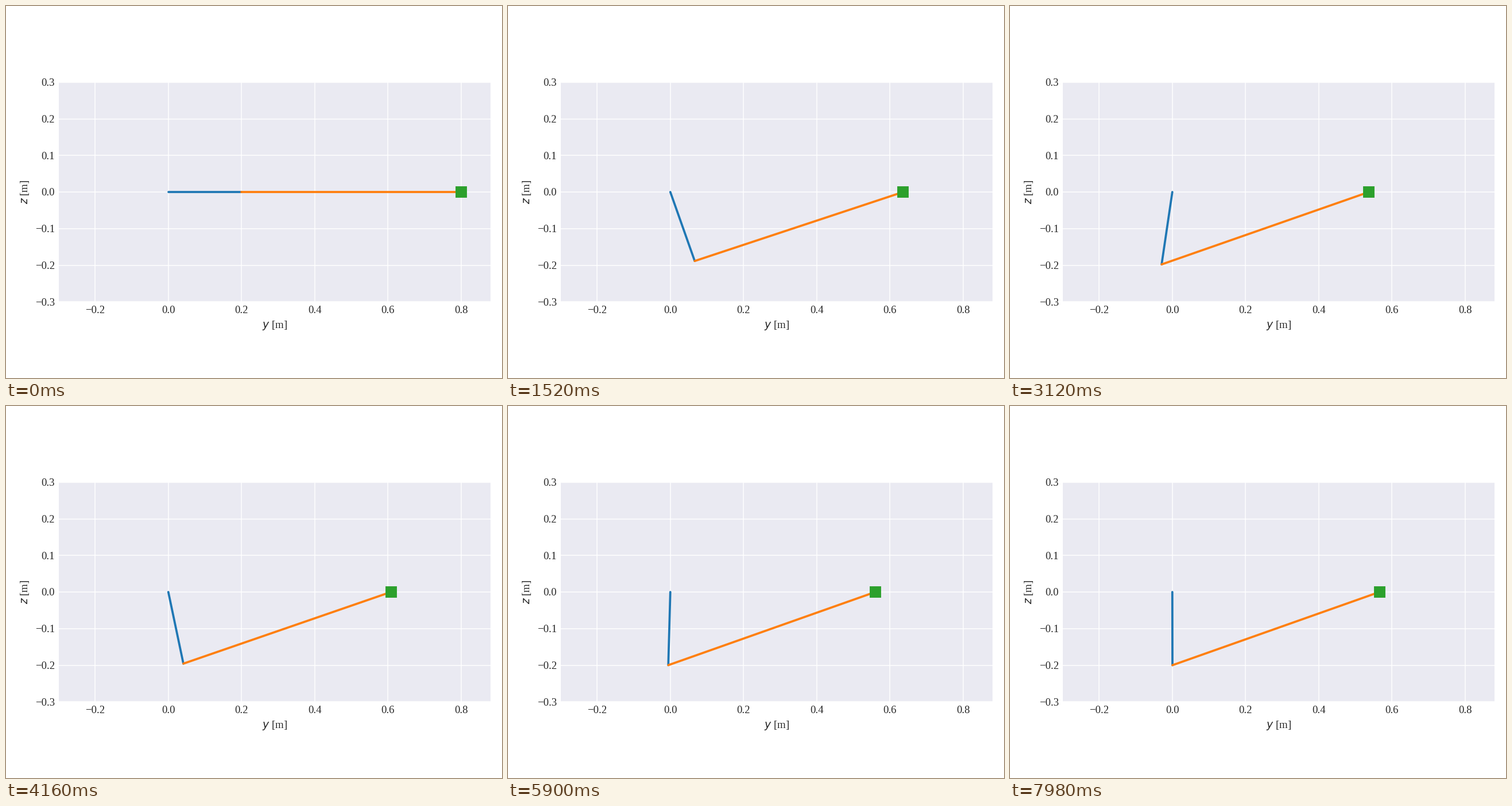
Recreate the animation shown at these times as a matplotlib script. Size 864 by 648 pixels, loop 8000 ms.

```python
import math

import matplotlib.pyplot as plt
from matplotlib.animation import FuncAnimation

# Slider-crank mechanism swinging down under gravity with a damped crank.
CRANK, ROD = 0.2, 0.6
M_CRANK, M_ROD, M_SLIDER = 1.0, 3.0, 1.675
GRAVITY, DAMPING = 9.81, 0.155
FRAMES, INTERVAL, SUBSTEPS = 400, 20, 10

WIDTH, HEIGHT, DPI = 864, 648, 135
INK = "0.15"

plt.rcParams.update({
    "font.family": "Liberation Serif",
    "font.size": 10,
    "mathtext.fontset": "dejavusans",
    "text.color": INK,
    "axes.labelcolor": INK,
    "axes.facecolor": "#EAEAF2",
    "axes.edgecolor": "white",
    "axes.linewidth": 0,
    "axes.grid": True,
    "axes.axisbelow": True,
    "grid.color": "white",
    "grid.linestyle": "-",
    "grid.linewidth": 0.8,
    "lines.solid_capstyle": "round",
    "xtick.color": INK,
    "ytick.color": INK,
    "xtick.major.size": 0,
    "ytick.major.size": 0,
})


def inertia(phi):
    """Effective inertia about the crank angle, measured from straight down."""
    s, c = math.sin(phi), math.cos(phi)
    sin_b = CRANK / ROD * c
    cos_b = math.sqrt(1 - sin_b**2)
    tan_b = sin_b / cos_b
    rod = (c + tan_b * s / 2)**2 + s**2 / 4 + (s / cos_b)**2 / 12
    slider = (c + tan_b * s)**2
    return CRANK**2 * (M_CRANK / 3 + M_ROD * rod + M_SLIDER * slider)


def rates(phi, w):
    h = 1e-4
    slope = (inertia(phi + h) - inertia(phi - h)) / (2 * h)
    weight = (M_CRANK + M_ROD) / 2 * GRAVITY * CRANK * math.sin(phi)
    return w, (-weight - DAMPING * w - slope * w * w / 2) / inertia(phi)


def rk4(phi, w, dt):
    a1, b1 = rates(phi, w)
    a2, b2 = rates(phi + a1 * dt / 2, w + b1 * dt / 2)
    a3, b3 = rates(phi + a2 * dt / 2, w + b2 * dt / 2)
    a4, b4 = rates(phi + a3 * dt, w + b3 * dt)
    return (phi + dt * (a1 + 2 * a2 + 2 * a3 + a4) / 6,
            w + dt * (b1 + 2 * b2 + 2 * b3 + b4) / 6)


def simulate():
    phi, w = math.pi / 2, 0.0
    angles = []
    for _ in range(FRAMES):
        angles.append(phi)
        for _ in range(SUBSTEPS):
            phi, w = rk4(phi, w, INTERVAL / 1000 / SUBSTEPS)
    return angles


angles = simulate()

fig = plt.figure(figsize=(WIDTH / DPI, HEIGHT / DPI), dpi=DPI, facecolor="white")
ax = fig.add_axes([91.5 / WIDTH, 132.75 / HEIGHT, 752.25 / WIDTH, 382.5 / HEIGHT])
ax.set_xlim(-0.3, 0.88)
ax.set_ylim(-0.3, 0.3)
ax.set_xticks([-0.2, 0, 0.2, 0.4, 0.6, 0.8])
ax.set_yticks([-0.3, -0.2, -0.1, 0, 0.1, 0.2, 0.3])
ax.set_xlabel("$y$ [m]")
ax.set_ylabel("$z$ [m]")

crank, = ax.plot([], [], color="#1f77b4", lw=2)
rod, = ax.plot([], [], color="#ff7f0e", lw=2)
slider, = ax.plot([], [], "s", color="#2ca02c", ms=10)


def update(i):
    y = CRANK * math.sin(angles[i])
    z = -CRANK * math.cos(angles[i])
    end = y + math.sqrt(ROD**2 - z**2)
    crank.set_data([0, y], [0, z])
    rod.set_data([y, end], [z, 0])
    slider.set_data([end], [0])
    return crank, rod, slider


anim = FuncAnimation(fig, update, frames=FRAMES, interval=INTERVAL,
                     repeat=True, repeat_delay=0, blit=False)
plt.show()
```
